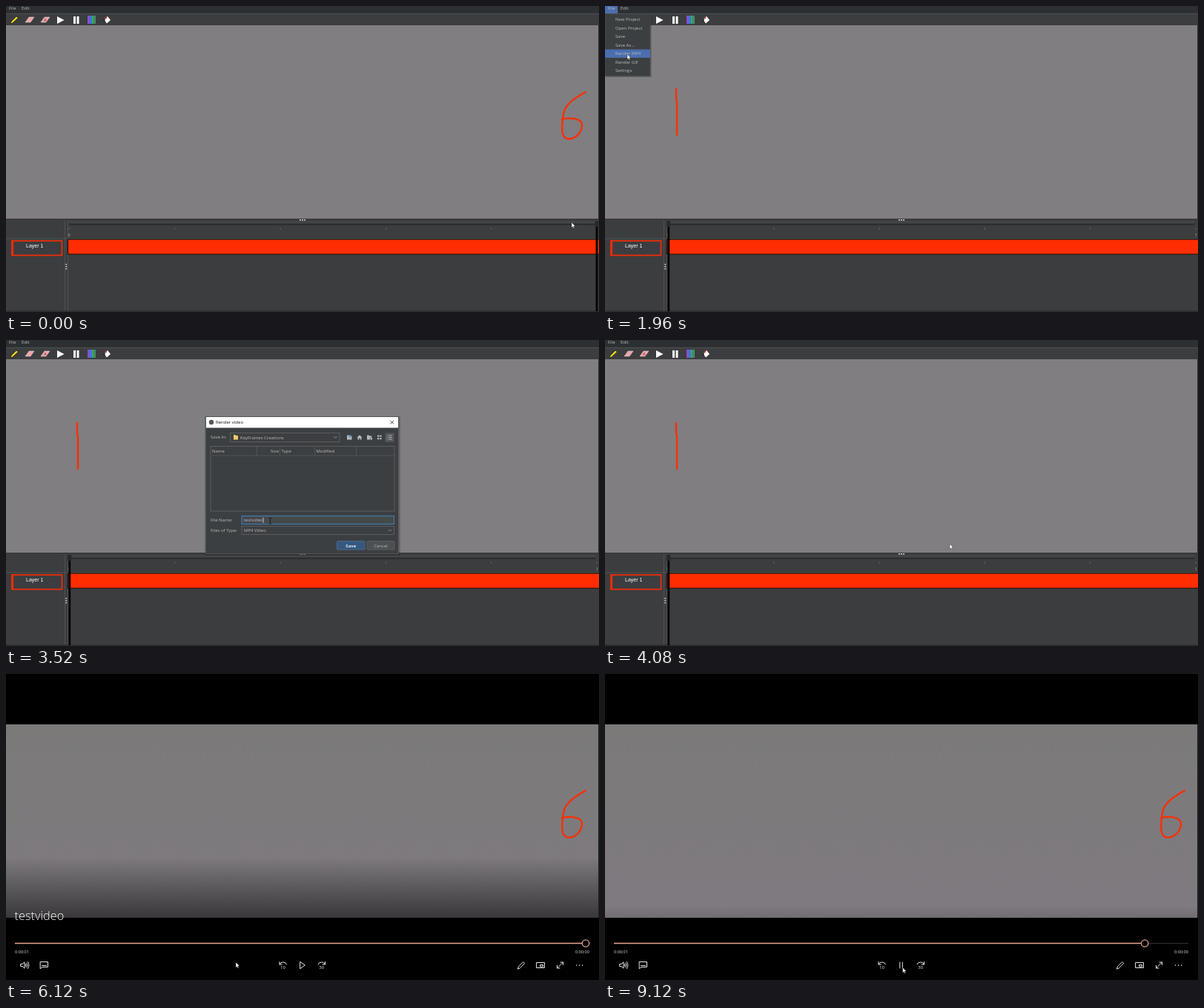
Animation, 800 px wide and 413 px high, one loop 9160 ms. Source, as an HTML page:

```html
<!DOCTYPE html>
<html lang="en">
<head>
<meta charset="utf-8">
<title>Rendering an animation to video</title>
<style>
  html, body { margin: 0; width: 100%; height: 100%; overflow: hidden; background: #000; }
  svg { display: block; width: 800px; height: 413px; }
  text { font: 6px "Open Sans", "Noto Sans", sans-serif; fill: #bbb; }
  .ink path { fill: none; stroke: #ff2d00; stroke-width: 2.3; stroke-linecap: round; stroke-linejoin: round; }
  .line { fill: none; stroke: #e8e8e8; stroke-width: 1; stroke-linecap: round; stroke-linejoin: round; }
  .box { fill: #3c3f41; stroke: #616365; stroke-width: .8; }
  .rule { stroke: #56595b; stroke-width: .8; }
  .chev { fill: none; stroke: #9a9da0; stroke-width: .8; }
  .time { font-size: 5.6px; fill: #ddd; }
  .skip { font-size: 6px; fill: #eee; text-anchor: middle; }
</style>
</head>
<body>
<svg viewBox="0 0 800 413">
  <defs>
    <linearGradient id="film" x2="0" y2="1">
      <stop stop-color="#7b7a79"/><stop offset="1" stop-color="#7f7a80"/>
    </linearGradient>
    <linearGradient id="shade" x2="0" y2="1">
      <stop stop-opacity="0"/><stop offset="1" stop-opacity="1"/>
    </linearGradient>
    <clipPath id="screen"><rect y="68" width="800" height="261"/></clipPath>
    <g id="arrow"><path d="M0 0V7.2L1.7 5.7 2.8 8.2 3.9 7.7 2.8 5.3H5Z" fill="#fff" stroke="#111" stroke-width=".4"/></g>
  </defs>

  <g id="editor">
    <rect width="800" height="413" fill="#3c3d3f"/>
    <rect width="800" height="10" fill="#2d3032"/>
    <path class="rule" d="M0 10.4H800"/>
    <rect y="26" width="799" height="261" fill="#807e80"/>
    <rect id="fileTab" width="17" height="10" fill="#4b6eaf"/>
    <text x="4" y="4.6">File</text><text x="21" y="4.6">Edit</text>

    <g id="tools">
      <path d="M6 24L7 21 14 14 16.500 16 9 23Z" fill="#e8d820" stroke="#1c1c1c" stroke-width=".8"/>
      <g fill="#f0a3a8" stroke="#d9d9d9" stroke-width=".5">
        <path d="M26 22L31 15H38L33 22Z"/><path d="M47 22L52 15H59L54 22Z"/>
      </g>
      <text x="51" y="20.800" style="fill:#802020">A</text>
      <path d="M69 14L78.500 19 69 24Z" fill="#fff"/>
      <path d="M91 14h3v10h-3zM95.500 14h3v10h-3z" fill="#fff"/>
      <path d="M110 13h3v11h-3z" fill="#8a4fd0"/><path d="M113 13h3v11h-3z" fill="#3c74e0"/>
      <path d="M116 13h2.500v11H116z" fill="#35b04a"/><path d="M118.500 13h2.500v11h-2.500z" fill="#4a8a70"/>
      <path d="M132 18L137 14 141 19 136 23.500Z" fill="#fff"/>
      <path d="M131 18.500L134 16.500 133 22Z" fill="#222"/><circle cx="135" cy="16" r="1.200" fill="#d33"/>
    </g>

    <g id="sketch" class="ink"><path/></g>

    <path d="M0 287.500H800" stroke="#333537"/>
    <g fill="#ddd">
      <path d="M396 288h2v1.500h-2zM399 288h2v1.500h-2zM402 288h2v1.500h-2z"/>
      <path d="M80.500 348h1.600v1.600h-1.600zM80.500 351h1.600v1.600h-1.600zM80.500 354h1.600v1.600h-1.600z"/>
    </g>
    <path d="M79.500 290V412M83.500 290V412" stroke="#55575a" stroke-width=".8"/>
    <path d="M85 291.500H795" stroke="#4d4f51"/><path d="M85 295H795" stroke="#202122" stroke-width="1.200"/>
    <path id="ticks" stroke="#66686a" stroke-width=".8"/>
    <text x="83.500" y="310.500" style="font-size:5.500px">0</text>
    <text x="795.500" y="310.500" style="font-size:5.500px">1</text>
    <path d="M0 314H800" stroke="#55575a" stroke-width=".8"/>
    <rect x="83.500" y="315" width="717" height="20" fill="#ff2d00" stroke="#111" stroke-width="1"/>
    <rect x="8" y="317" width="67.500" height="19.500" fill="#3c3d40" stroke="#f52c08" stroke-width="1.700"/>
    <path d="M8.700 316.500V337" stroke="#f52c08" stroke-width="2.800"/>
    <text x="27" y="325.600" style="font:7px 'Liberation Sans',Arial,sans-serif;fill:#fff">Layer 1</text>
    <path d="M0 412H800" stroke="#222" stroke-width="1"/>
    <g id="playhead">
      <rect x="-2.500" y="290" width="5" height="8" fill="#27292a"/>
      <rect x="-1.400" y="298" width="2.900" height="114" fill="#050505"/>
    </g>
    <path d="M799.500 26V287" stroke="#333"/>

    <g id="menu">
      <rect x="1.500" y="12" width="61" height="84" fill="#000" opacity=".25"/>
      <rect y="10.500" width="61" height="84" fill="#3c3f41" stroke="#515456" stroke-width=".7"/>
      <rect id="hover" width="61" height="11.300" fill="#4b6eaf"/>
      <g id="items"></g>
    </g>

    <g id="dialog">
      <rect x="268" y="103" width="264" height="188" fill="#000" opacity=".2"/>
      <rect x="269.500" y="103.500" width="260" height="185" fill="#3c3f41" stroke="#55585a"/>
      <rect x="270" y="104" width="259" height="14.500" fill="#fff"/>
      <circle cx="277" cy="111" r="3.200" fill="#555"/>
      <text x="283" y="113.200" style="fill:#111">Render video</text>
      <path d="M518.500 108.800l4.600 4.600m0-4.600l-4.600 4.600" stroke="#222" stroke-width=".8"/>

      <text x="276" y="133.300">Save In:</text>
      <rect class="box" x="302.500" y="125.500" width="147.500" height="12"/>
      <path d="M307 128h2.500l1 1H313v5.500h-6z" fill="#f0cb6a"/>
      <text x="316" y="133.500">KeyFrames Creations</text>
      <path class="chev" d="M442 130l2.300 2.300 2.300-2.300M516 255.800l2.300 2.300 2.300-2.300"/>
      <rect x="511.500" y="125.500" width="12" height="12" fill="#55585b"/>
      <g fill="#b5b8ba">
        <path d="M460 128.500h2.500l1 1h3v5h-6.500z"/>
        <path d="M473.500 131.500l3.500-3.300 3.500 3.300h-1v3h-1.800v-2h-1.400v2h-1.800v-3z"/>
        <path d="M487 128.500h2.500l1 1h3v2h-2v3H487zM492 132h2v2.500h-2z"/>
        <path d="M501 128.500h2.300v2.300H501zM504.300 128.500h2.300v2.300h-2.300zM501 132h2.300v2.300H501zM504.300 132h2.300v2.300h-2.300z"/>
        <path d="M514.500 128.500h1v1h-1zM516.500 128.500h4v1h-4zM514.500 131h1v1h-1zM516.500 131h4v1h-4zM514.500 133.500h1v1h-1zM516.500 133.500h4v1h-4z"/>
      </g>
      <path d="M464 128v4m-1.500-1.500L464 128l1.500 2.500" stroke="#4a88c7" fill="none"/>

      <rect class="box" x="276" y="143.500" width="248" height="87.500"/>
      <path class="rule" d="M276 156H524M338.500 144V156M369.500 144V156M416.500 144V156M472.500 144V156"/>
      <text x="278" y="152.300">Name</text>
      <text x="368" y="152.300" text-anchor="end">Size</text>
      <text x="371.500" y="152.300">Type</text>
      <text x="418.500" y="152.300">Modified</text>

      <text x="276" y="245">File Name:</text>
      <rect x="318" y="237.500" width="205.500" height="11" fill="#45494a" stroke="#4378ab" stroke-width="1.200"/>
      <text id="typed" x="321" y="245.200"></text>
      <rect id="caret" y="239.500" width=".8" height="7.500" fill="#ddd"/>
      <text x="276" y="259">Files of Type:</text>
      <rect class="box" x="318" y="251.500" width="205.500" height="11"/>
      <text x="321" y="259.200">MP4 Video</text>
      <path class="chev" d="M516 255.800l2.300 2.300 2.300-2.300"/>
      <rect x="446.500" y="271.500" width="37.500" height="11.500" rx="1" fill="#365880" stroke="#4c708c" stroke-width=".8"/>
      <text x="465.300" y="279.500" text-anchor="middle" style="font-weight:700;fill:#e4e8ec">Save</text>
      <rect x="487" y="271.500" width="37" height="11.500" rx="1" fill="#4c5052" stroke="#5e6264" stroke-width=".8"/>
      <text x="505.500" y="279.500" text-anchor="middle">Cancel</text>
    </g>
  </g>

  <g id="progress">
    <rect width="800" height="413" fill="#807e80"/>
    <rect width="800" height="53" fill="#3c3d41"/>
    <rect width="800" height="23" fill="#2e3133"/>
    <path d="M0 23.500H800" stroke="#55575a"/>
    <path d="M0 52.500H800" stroke="#4c4d50"/>
    <text id="status" x="490.500" y="42.500" text-anchor="end" style="font-size:10.900px;fill:#c0c1c3"></text>
    <rect x="496.500" y="29" width="287.500" height="19" rx="1" fill="#55585a"/>
    <rect id="fill" x="496.500" y="29" height="19" rx="1" fill="#3f82d2"/>
    <text id="percent" x="640" y="41.800" text-anchor="middle" style="font-size:9px;font-weight:600;fill:#b4cdec"></text>
  </g>

  <g id="player">
    <rect width="800" height="413"/>
    <g clip-path="url(#screen)">
      <rect y="68" width="799" height="261" fill="url(#film)"/>
      <g id="footage" class="ink" transform="translate(0 41.300)"><path/></g>
      <rect id="veil" y="247" width="800" height="150" fill="url(#shade)"/>
    </g>
    <text id="title" x="11.500" y="331.500" style="font-size:16.300px;font-weight:300;fill:#fff">testvideo</text>
    <path d="M12 363.500H787" stroke="#333"/>
    <path id="done" stroke="#e9a68f" stroke-width="1.500"/>
    <circle id="knob" cy="363.500" r="4.700" fill="#000" stroke="#d9a08c" stroke-width="1.300"/>
    <text id="elapsed" class="time" x="12" y="377"></text>
    <text id="left" class="time" x="787" y="377" text-anchor="end"></text>
    <rect id="button" x="388" y="380.500" width="24" height="24.500" fill="#17171a"/>
    <g class="line">
      <path d="M20 391.500h2l3-2.700v8.400l-3-2.700h-2zM26.500 391.500q1 1.500 0 3M28 390q2 3 0 6M29.500 388.500q3 4.500 0 9"/>
      <path d="M46.500 388.500h10v7h-7.500l-2.500 2zM48.500 393.500h6"/>
      <path d="M369 392a5 4.500 0 0 1 9.500 0M369 388.500v3.500h3.300M430.500 392a5 4.500 0 0 0-9.500 0M430.500 388.500v3.500h-3.300"/>
      <path id="play" d="M397 388.500L403.300 393 397 397.500Z"/>
      <path id="pause" d="M397.800 389v8M401.300 389v8"/>
      <path d="M690.500 397.800l1-3 6.300-6.300 2 2-6.300 6.300z"/>
      <path d="M716 389.500h10.500v7H716zM721 392.500h3.500v2.500H721z"/>
      <path d="M743.500 397l8-8M748 389h3.500v3.500M743.500 393.500V397h3.500"/>
    </g>
    <text class="skip" x="373.500" y="397.500">10</text><text class="skip" x="425.800" y="397.500">30</text>
    <path d="M769 392.500h1.300v1.300H769zM773 392.500h1.300v1.300H773zM777 392.500h1.300v1.300H777z" fill="#eee"/>
    <path d="M799.500 68V329" stroke="#222"/>
  </g>

  <use id="pointer" href="#arrow"/>
  <path id="beam" d="M354.500 240.500h1.500l.5.5.5-.5h1.500M356.500 241v6.500M354.500 248h1.500l.5-.5.5.5h1.500" fill="none" stroke="#111" stroke-width=".8"/>
</svg>

<script>
const LOOP = 9160, STEP = 40;
const ZOOM = 4200, PLAYER = 5760, PLAY = 6940;
const DIGITS = [
  "M96 112V127L97 129V174",
  "M205 136L223 134.500Q227 134.500 227 142L229 153Q229 165 227 170L217 182Q226 186 245 188",
  "M345 124Q372 118 370 133Q366 145 354 147Q376 148 376 162Q372 180 345 174",
  "M482 120L475 151H507M499 124V181",
  "M650 122H620L618 145Q646 142 645 160Q642 180 615 174",
  "M782 116C768 124 754 132 752 146C749 165 749 177 757 179C768 181 778 170 777 159C775 152 762 150 750 153"
];
const ITEMS = ["New Project", "Open Project", "Save", "Save As...", "Render MP4", "Render GIF", "Settings"];
// pointer stops: time, x, y
const PATH = [
  [0, 763, 292], [120, 763, 292], [760, 8, 4], [1200, 8, 4], [1800, 30, 65], [2160, 30, 65],
  [2700, 356, 244], [3600, 356, 244], [3880, 465, 275], [ZOOM, 465, 275],
  [PLAYER, 310, 389], [6360, 310, 389], [6760, 401.500, 396], [LOOP, 401.500, 396]
];

const $ = id => document.getElementById(id);
const clamp = v => Math.max(0, Math.min(1, v));
const ramp = (t, from, to) => clamp((t - from) / (to - from));
const ease = p => p * p * (3 - 2 * p);
const show = (id, on) => $(id).style.display = on ? "" : "none";
const set = (id, attrs) => { for (const k in attrs) $(id).setAttribute(k, attrs[k]); };
const draw = (id, digit) => $(id).firstElementChild.setAttribute("d", DIGITS[digit]);

$("items").innerHTML = ITEMS.map((s, i) => `<text x="14" y="${20.3 + 11.5 * i}">${s}</text>`).join("");
set("ticks", { d: [0, 1, 2, 3, 4, 5].map(i => `M${85.5 + 142.3 * i} 299v3`).join("") });

function pointerAt(t) {
  let i = 0;
  while (i < PATH.length - 2 && t >= PATH[i + 1][0]) i++;
  const [t0, x0, y0] = PATH[i], [t1, x1, y1] = PATH[i + 1];
  const p = ease(ramp(t, t0, t1));
  return [x0 + (x1 - x0) * p, y0 + (y1 - y0) * p];
}

function editor(t, y) {
  const rewound = t >= STEP;
  const menu = t >= 1000 && t < 2120;
  draw("sketch", rewound ? 0 : 5);
  set("playhead", { transform: `translate(${rewound ? 85.7 : 797})` });
  show("fileTab", menu);
  show("menu", menu);
  const row = Math.floor((y - 12.5) / 11.5);
  show("hover", row >= 0);
  set("hover", { y: 12.6 + 11.5 * row });

  show("dialog", t >= 2280 && t < 4040);
  const typed = $("typed");
  typed.textContent = "testvideo".slice(0, Math.floor(9 * ramp(t, 2760, 3480)));
  if (t >= 2280 && t < 4040) set("caret", { x: 321 + typed.getComputedTextLength() });
}

function progress(t) {
  const p = ramp(t, 4560, 5480);
  $("status").textContent = p < 1 ? "Rendering MP4 video..." : "Rendering finished!";
  $("percent").textContent = Math.floor(p * 100) + "%";
  set("fill", { width: 287.5 * p });
}

function player(t) {
  const playing = t >= PLAY;
  draw("footage", playing ? Math.min(5, Math.floor((t - PLAY) / 320)) : 5);
  const x = playing ? 12 + 0.3734 * Math.max(0, t - 7202) : 782;
  set("done", { d: `M12 363.500H${x}` });
  set("knob", { cx: x });
  const late = x > 400;
  $("elapsed").textContent = late ? "0:00:01" : "0:00:00";
  $("left").textContent = late ? "0:00:00" : "0:00:01";
  show("play", !playing);
  show("pause", playing);
  set("button", { opacity: t < 6640 ? 0 : 1 - ramp(t, 7320, 7480) });
  set("title", { opacity: 1 - ramp(t, 7120, 7380) });
  set("veil", { y: 247 + 66 * ramp(t, 7040, 7400) });
}

function frame(now) {
  const t = Math.floor(now % LOOP / STEP) * STEP;
  const [x, y] = pointerAt(t);
  const zoomed = t >= ZOOM && t < PLAYER;
  const beam = t >= 2680 && t < 3680;
  show("editor", t < ZOOM);
  show("progress", zoomed);
  show("player", t >= PLAYER);
  show("pointer", !zoomed && !beam);
  show("beam", beam);
  set("pointer", { x, y });
  if (t < ZOOM) editor(t, y);
  else if (zoomed) progress(t);
  else player(t);
  requestAnimationFrame(frame);
}

let start;
requestAnimationFrame(now => { start = now; tick(now); });
function tick(now) { frame(now - start); }
const nextFrame = window.requestAnimationFrame.bind(window);
window.requestAnimationFrame = () => nextFrame(tick);
</script>
</body>
</html>
```
